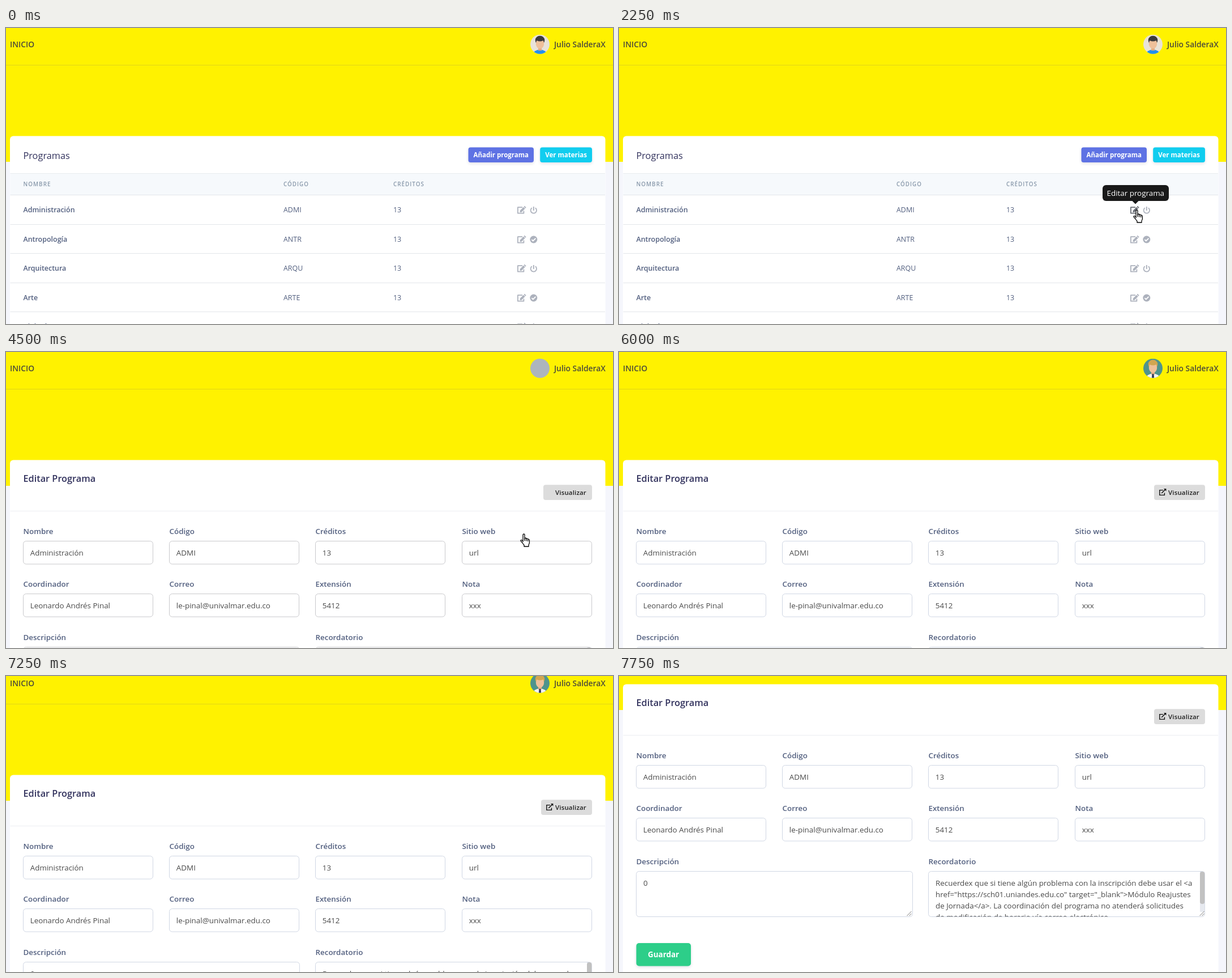
Animation of 1072 by 522 pixels, one loop 8000 ms. Source, as an HTML page with a canvas:

```html
<!DOCTYPE html>
<html lang="es">
<head>
<meta charset="utf-8">
<title>Programas</title>
<style>
html, body { margin: 0; width: 100%; height: 100%; overflow: hidden; background: #f8f9fe; }
canvas { display: block; }
</style>
</head>
<body>
<canvas id="stage" width="1072" height="522"></canvas>
<script>
const ctx = document.getElementById('stage').getContext('2d');
const W = 1072, H = 522, LOOP = 8000, STEP = 250;
const SLATE = '#525f7f', NAVY = '#32325d', INK = '#4a4a4a', MUTED = '#adb2bd';
const COLUMNS = [30.5, 288.5, 546.5, 805.5];
const SIZE = { title: 16.3, nav: 13.8, body: 13.4, cell: 12.45, small: 11.5, head: 9.9 };

const ARROW = new Path2D('M.5 .5V16.5L4.2 13L6.8 18.8L9.2 17.8L6.7 12H11.5Z');
const HAND = new Path2D('M5 15V2.5Q5 1 6.5 1T8 2.5V9Q8.2 8 9.4 8T10.9 9.5Q11.2 8.6 12.3 8.8T13.7 10.3Q14 9.7 15 10T16.4 12V16Q16.4 18 15 20V23H7V20.5Q5.5 19 4 16.5L1.2 13.3Q.6 12 1.8 11.5T5 14');
const KNUCKLES = new Path2D('M8 9V13M10.9 10V13.5M13.7 10.5V14');

// start time, cursor shape, left, top
const CURSOR = [
  [500, 'arrow', 587, 475], [750, 'arrow', 633, 432], [1000, 'arrow', 706, 391],
  [1250, 'arrow', 844, 330], [1500, 'arrow', 872, 329], [1750, 'arrow', 888, 329],
  [2000, 'arrow', 910, 321], [2250, 'hand', 908, 320], [5250, 'arrow', 930, 331],
  [5500, 'arrow', 1010, 274], [5750, 'arrow', 1024, 241], [6000, 'none', 0, 0]
];
const SCROLL = [[0, 0], [7250, 16], [7500, 72], [7750, 176]];

const at = (list, t) => list.filter(k => k[0] <= t).pop();

function text(str, x, y, size, color, weight = 400, spacing = 0, align = 'left') {
  ctx.font = `${weight} ${size}px "Open Sans", "Noto Sans", sans-serif`;
  ctx.letterSpacing = spacing + 'px';
  ctx.textAlign = align;
  ctx.fillStyle = color;
  ctx.fillText(str, x, y);
}

function rect(x, y, w, h, color) {
  ctx.fillStyle = color;
  ctx.fillRect(x, y, w, h);
}

function box(x, y, w, h, r, fill, border) {
  ctx.beginPath();
  ctx.roundRect(x, y, w, h, r);
  ctx.fillStyle = fill;
  ctx.fill();
  if (border) {
    ctx.strokeStyle = border;
    ctx.lineWidth = 1;
    ctx.stroke();
  }
}

function ellipse(x, y, rx, ry, color) {
  ctx.beginPath();
  ctx.ellipse(x, y, rx, ry, 0, 0, 7);
  ctx.fillStyle = color;
  ctx.fill();
}

function line(points, width, color) {
  ctx.beginPath();
  points.forEach(p => ctx.lineTo(...p));
  ctx.lineWidth = width;
  ctx.strokeStyle = color;
  ctx.stroke();
}

function shape(points, color) {
  ctx.beginPath();
  points.forEach(p => ctx.lineTo(...p));
  ctx.fillStyle = color;
  ctx.fill();
}

function place(x, y, draw) {
  ctx.save();
  ctx.translate(x, y);
  draw();
  ctx.restore();
}

function editIcon(x, y, color) {
  place(x, y, () => {
    ctx.lineJoin = 'round';
    line([[9, 2.7], [.9, 2.7], [.9, 13.2], [11.4, 13.2], [11.4, 9]], 1.8, color);
    shape([[10.8, 2.2], [13.7, 5.1], [7.6, 11.2], [4.4, 11.6], [4.8, 8.4]], color);
    shape([[11.5, 1.5], [12.8, .3], [15.6, 3.1], [14.4, 4.4]], color);
  });
}

function powerIcon(x, y) {
  ctx.beginPath();
  ctx.arc(x, y + .5, 5.2, -.95, Math.PI + .95);
  ctx.lineWidth = 1.8;
  ctx.strokeStyle = MUTED;
  ctx.stroke();
  line([[x, y - 6], [x, y + 1]], 1.9, MUTED);
}

function checkIcon(x, y) {
  ellipse(x, y, 6.5, 6.5, MUTED);
  line([[x - 3.4, y + .2], [x - 1, y + 2.5], [x + 3.6, y - 2.1]], 1.8, '#fff');
}

function linkIcon(x, y) {
  place(x, y, () => {
    line([[7, 2.6], [.8, 2.6], [.8, 11.4], [9.4, 11.4], [9.4, 7.5]], 1.4, '#111');
    line([[4.2, 8], [10.6, 1.8]], 1.6, '#111');
    shape([[8, 0], [12.4, 0], [12.4, 4.4]], '#111');
  });
}

function avatar(kind) {
  const x = 943, y = 28.7;
  if (kind === 'blank') return ellipse(x, y, 17, 17, '#adb5bd');
  const dark = kind === 'dark';
  const hair = dark ? '#3b3a3c' : '#d2a650';
  ctx.save();
  ctx.beginPath();
  ctx.arc(x, y, 17, 0, 7);
  ctx.clip();
  rect(x - 17, y - 17, 34, 34, dark ? '#e9e3d8' : '#4f948c');
  ellipse(x, y + 17, 12, 7.5, dark ? '#2490ee' : '#f4f4f4');
  rect(x - 3, y + 4, 6, 7, '#e0ab82');
  ellipse(x, y - 7, 8.3, 8, hair);
  ellipse(x, y - 1, 7.2, 8.8, '#efc09a');
  ellipse(x, y - 9.5, 7.4, 4.3, hair);
  if (!dark) shape([[x - 1.5, y + 10], [x + 1.5, y + 10], [x + 2, y + 17], [x - 2, y + 17]], '#2c3350');
  ctx.restore();
}

function backdrop(kind) {
  rect(0, 0, W, 720, '#f5f6fc');
  rect(0, 0, W, 236, '#fff200');
  rect(0, 65, W, 1, '#e0d519');
  text('INICIO', 7, 34, SIZE.nav, '#4b4a3a', 600);
  avatar(kind);
  text('Julio SalderaX', 968, 34, SIZE.nav, '#4b4a3a', 600);
  box(7, 190.5, 1051.5, 600, 6, '#fff');
}

function button(x, y, w, h, r, color) {
  ctx.save();
  ctx.shadowBlur = 5;
  ctx.shadowOffsetY = 2;
  ctx.shadowColor = 'rgba(50,50,93,.15)';
  box(x, y, w, h, r, color);
  ctx.restore();
}

function listPage(t) {
  const hover = t >= 2250;
  backdrop('dark');
  text('Programas', 30.5, 231, SIZE.title, NAVY, 500);
  button(816.5, 210.5, 115.5, 26.5, 4, '#5e72e4');
  text('Añadir programa', 874.2, 228, SIZE.small, '#fff', 700, 0, 'center');
  button(943.2, 210.5, 91.8, 26.5, 4, '#11cdef');
  text('Ver materias', 989.1, 228, SIZE.small, '#fff', 700, 0, 'center');

  rect(7.5, 256, 1050.5, 39, '#f6f9fc');
  rect(7.5, 256, 1050.5, 1, '#e9ecef');
  text('NOMBRE', 30.5, 279, SIZE.head, '#8898aa', 600, 1);
  text('CÓDIGO', 490, 279, SIZE.head, '#8898aa', 600, 1);
  text('CRÉDITOS', 684, 279, SIZE.head, '#8898aa', 600, 1);

  ['Administración', 'Antropología', 'Arquitectura', 'Arte', 'Biología'].forEach((name, i) => {
    const y = 294 + Math.round(i * 51.5);
    rect(7.5, y, 1050.5, 1, '#e3e6ea');
    text(name, 30.5, y + 31, SIZE.cell, SLATE, 600);
    text(name.slice(0, 4).toUpperCase(), 490, y + 31, SIZE.cell, SLATE);
    text('13', 684, y + 31, SIZE.cell, SLATE);
    editIcon(903, y + 19.5, hover && i === 0 ? '#6b6f76' : MUTED);
    (i % 2 ? checkIcon : powerIcon)(931.8, y + 27);
  });

  if (hover) {
    box(854, 277, 117, 28, 6, '#191919');
    shape([[906, 304.5], [918, 304.5], [912, 310.5]], '#191919');
    text('Editar programa', 912.3, 296, SIZE.body, '#fff', 400, 0, 'center');
  }
}

function field(x, y, label, value, border) {
  text(label, x, y - 12.5, SIZE.body, SLATE, 600);
  box(x, y, 229, 40.5, 5, '#fff', border);
  text(value, x + 12.3, y + 25.5, SIZE.body, INK);
}

function grip(x, y) {
  line([[x - 8, y], [x, y - 8]], 1, '#777');
  line([[x - 4, y], [x, y - 4]], 1, '#777');
}

function textarea(x, label, lines, border) {
  const y = 520.5;
  text(label, x, y - 12.5, SIZE.body, SLATE, 600);
  box(x, y, 488, 80, 5, '#fff', border);
  ctx.save();
  ctx.beginPath();
  ctx.rect(x, y + 1, 487, 79);
  ctx.clip();
  lines.forEach((s, i) => text(s, x + 12.5, y + 25.5 + i * 20.1, SIZE.body, INK));
  ctx.restore();
}

function formPage(t) {
  const border = t < 5000 ? '#c9c9cc' : '#d0d7e4';
  const loaded = t >= 4750;
  place(0, -at(SCROLL, t)[1], () => {
    backdrop(t < 5000 ? 'blank' : 'light');
    text('Editar Programa', 30.5, 228.5, SIZE.title, NAVY, 600);
    const left = loaded ? 945 : 949;
    box(left, 234.3, 1035 - left, 26.7, 4, '#dcdcdc');
    if (loaded) linkIcon(954, 241);
    text('Visualizar', 970, 251.5, SIZE.small, '#212121', 600, .15);
    rect(7.5, 280, 1050.5, 1, '#eceef2');

    [
      [['Nombre', 'Administración'], ['Código', 'ADMI'], ['Créditos', '13'], ['Sitio web', 'url']],
      [['Coordinador', 'Leonardo Andrés Pinal'], ['Correo', 'le-pinal@univalmar.edu.co'], ['Extensión', '5412'], ['Nota', 'xxx']]
    ].forEach((row, r) => row.forEach(([label, value], c) =>
      field(COLUMNS[c], 333.5 + r * 93, label, value, border)));

    textarea(COLUMNS[0], 'Descripción', ['0'], border);
    grip(516.5, 599);
    textarea(COLUMNS[2], 'Recordatorio', [
      'Recuerdex que si tiene algún problema con la inscripción debe usar el <a',
      'href="https://sch01.uniandes.edu.co" target="_blank">Módulo Reajustes',
      'de Jornada</a>. La coordinación del programa no atenderá solicitudes',
      'de modificación de horario vía correo electrónico.'
    ], border);
    rect(1026, 521, 8.3, 71, '#e6e9ef');
    box(1026, 521, 8.3, 57, 4, '#c1c1c1');
    grip(1033.5, 599);

    button(30.5, 647, 96.5, 40.5, 5, '#2dce89');
    text('Guardar', 78.6, 672, SIZE.body, '#fff', 700, 0, 'center');
  });
}

function cursor(t) {
  const key = at(CURSOR, t);
  if (!key || key[1] === 'none') return;
  place(key[2], key[3], () => {
    const hand = key[1] === 'hand';
    const path = hand ? HAND : ARROW;
    ctx.fillStyle = '#fff';
    ctx.strokeStyle = '#000';
    ctx.lineWidth = hand ? 1.3 : 1;
    ctx.lineJoin = 'round';
    ctx.fill(path);
    ctx.stroke(path);
    if (hand) ctx.stroke(KNUCKLES);
  });
}

function draw(now) {
  const t = Math.floor((now % LOOP) / STEP) * STEP;
  ctx.clearRect(0, 0, W, H);
  (t < 4500 ? listPage : formPage)(t);
  cursor(t);
}

let start;
function tick(now) {
  start ??= now;
  draw(now - start);
  requestAnimationFrame(tick);
}
draw(0);
requestAnimationFrame(tick);
</script>
</body>
</html>
```
